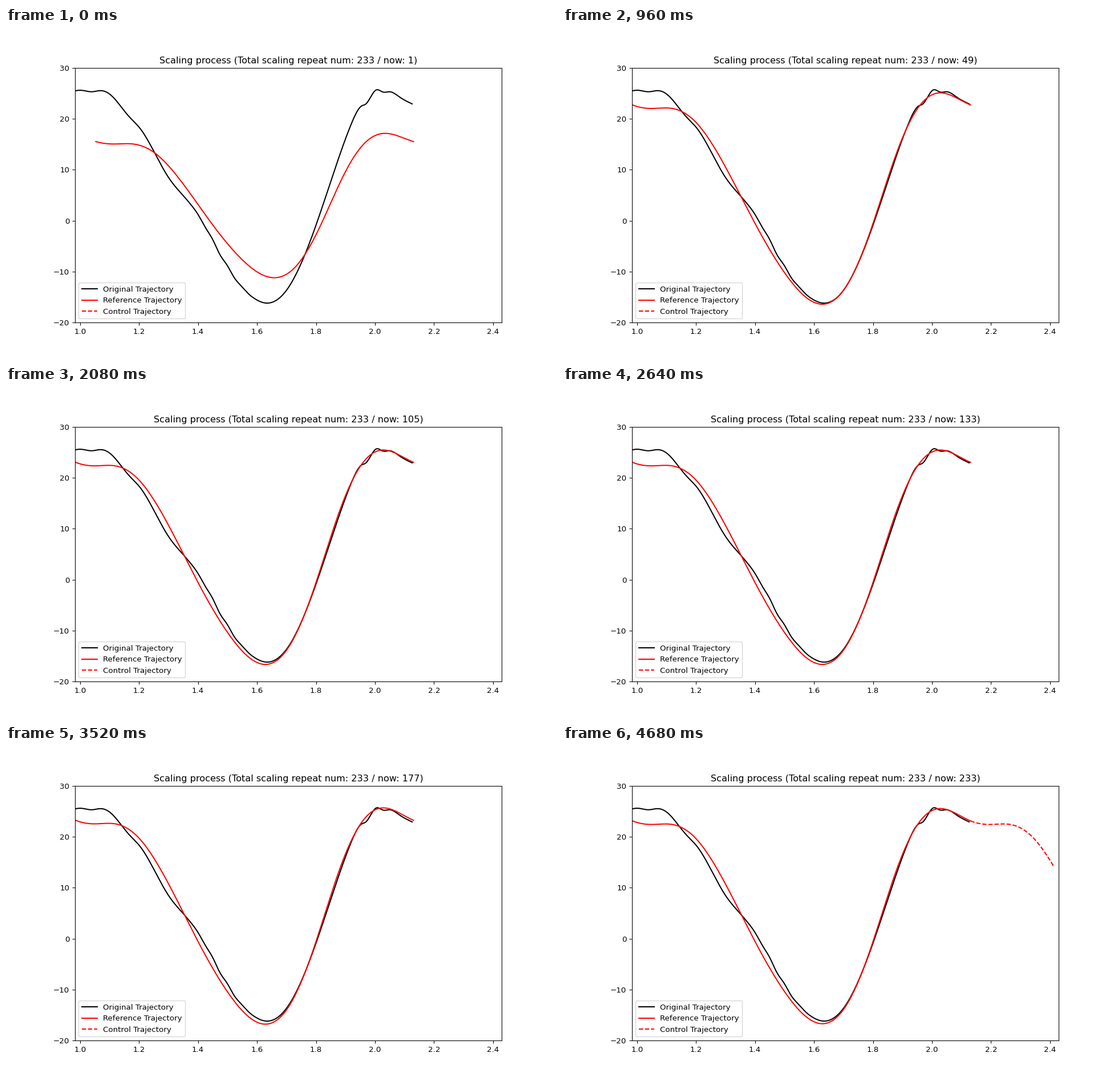
These frames come from a looping animation (966x580 px, 5.28 s). A matplotlib script:

```python
import numpy as np
import matplotlib.pyplot as plt
from matplotlib.animation import FuncAnimation

STEP_MS = 40
FRAMES = 132
LAST_STEP = 117
TOTAL = 233
END, PERIOD, CONTROL_SPAN = 2.1305, 1.0767, 0.2815
BEST_TIME = 1.064
GOLDEN = (5 ** 0.5 - 1) / 2

# Key points of the measured curve: turns and bends only
MEASURED = [
    (.983, 25.45), (1, 25.58), (1.04, 25.28), (1.07, 25.5), (1.1, 24.85),
    (1.165, 20.5), (1.2035, 18.1), (1.298, 8.65), (1.385, 2.45),
    (1.501, -9.15), (1.586, -15.05), (1.6385, -16.17), (1.7, -13.65),
    (1.809, .62), (1.919, 18.9), (1.956, 22.55), (1.967, 22.8),
    (2.004, 25.64), (2.027, 25.22), (2.05, 25.28), (2.083, 24.25),
    (2.1257, 22.9),
]

# Key points of one gait cycle, time measured back from its end
CYCLE = [
    (-1.015, 15.03), (-.95, 15.03), (-.88, 13.4), (-.8, 8.65), (-.69, -.1),
    (-.58, -7.7), (-.47, -11.2), (-.405, -9.35), (-.33, -2.7), (-.23, 9.7),
    (-.165, 15.25), (-.1, 17.12), (0, 15.5),
]

# Line searches: first evaluation, amplitude, direction (amplitude, time)
SEARCHES = [
    (2, 1, 0, 1),
    (25, 1.464, 1, 0),
    (51, 1.485, 0, 1),
    (71, 1.485, 0, 1),
    (115, 1.485, -.146, .822),
    (171, 1.498, 0, 0),
    (187, 1.49, 0, 1),
]


def spline(points, x):
    """Natural cubic spline through the points, sampled at x."""
    px, py = np.array(points, float).T
    h = np.diff(px)
    slope = np.diff(py) / h
    n = len(px)
    a, b = np.eye(n), np.zeros(n)
    for i in range(1, n - 1):
        a[i, i - 1:i + 2] = h[i - 1], 2 * (h[i - 1] + h[i]), h[i]
        b[i] = 6 * (slope[i] - slope[i - 1])
    m = np.linalg.solve(a, b)
    k = np.clip(np.searchsorted(px, x) - 1, 0, n - 2)
    s = x - px[k]
    return (py[k] + s * (slope[k] - h[k] * (2 * m[k] + m[k + 1]) / 6)
            + s ** 2 * m[k] / 2 + s ** 3 * (m[k + 1] - m[k]) / (6 * h[k]))


def gait(u):
    """Periodic reference angle."""
    wrapped = [(p + i * PERIOD, y) for i in (-1, 0, 1) for p, y in CYCLE]
    return spline(wrapped, u)


def measured(t):
    """Measured angle, with a faint tremor on the way down."""
    tremor = np.exp(-((t - 1.48) / .07) ** 2) * np.cos(2 * np.pi * (t - 1.447) / .054)
    return spline(MEASURED, t) + .2 * tremor


def search_offset(i):
    """Bracketing steps, then alternating golden-section steps."""
    if i < 3:
        return (0, 1, -1 - GOLDEN)[i]
    return (-1) ** i * GOLDEN ** (i - 2)


def scales(n):
    """Amplitude and time scale tried at evaluation n."""
    started = [s for s in SEARCHES if s[0] <= n]
    if not started:
        return 1, 1
    first, amp, d_amp, d_time = started[-1]
    step = search_offset(n - first)
    return amp + step * d_amp, BEST_TIME + step * d_time


fig, ax = plt.subplots(figsize=(10, 6.0045), dpi=96.6)
ax.set_xlim(.9827, 2.4299)
ax.set_ylim(-20, 30)

t = np.linspace(MEASURED[0][0], MEASURED[-1][0], 400)
u = np.linspace(-PERIOD, 0, 300)
cycle = gait(u)

ax.plot(t, measured(t), "k-", label="Original Trajectory")
reference, = ax.plot([], [], "r-", label="Reference Trajectory")
control, = ax.plot([], [], "r--", label="Control Trajectory")
ax.legend(loc="lower left")
title = ax.set_title("")


def update(frame):
    step = min(frame, LAST_STEP)
    n = min(2 * step + 1, TOTAL)
    amp, time = scales(n)
    reference.set_data(END + time * u, amp * cycle)
    ahead = np.linspace(0, CONTROL_SPAN, 100) if step == LAST_STEP else np.array([])
    control.set_data(END + ahead, amp * gait(ahead / time))
    title.set_text(f"Scaling process (Total scaling repeat num: {TOTAL} / now: {n})")
    return reference, control, title


anim = FuncAnimation(fig, update, frames=FRAMES, interval=STEP_MS,
                     repeat=True, repeat_delay=0, blit=False)
plt.show()
```
